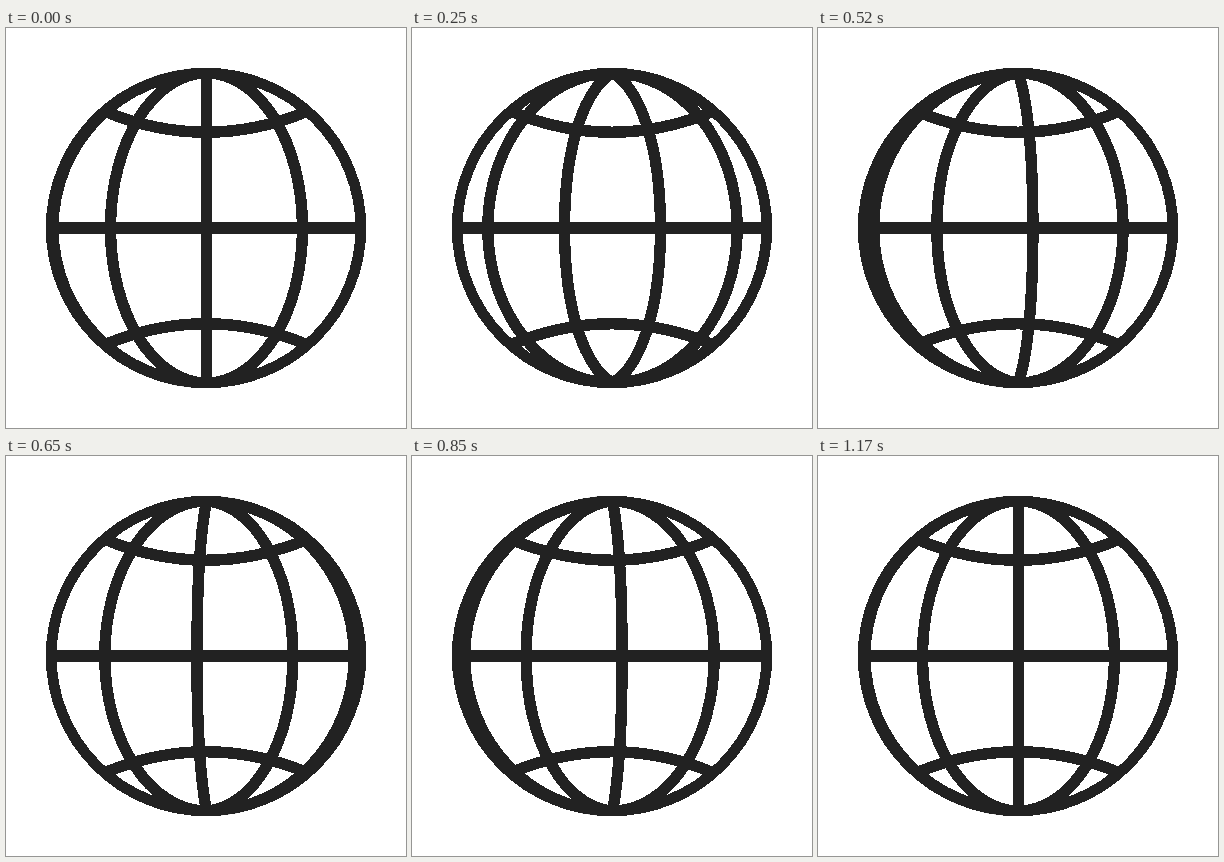
Recreate the animation shown at these times as an HTML page. Size 400x400 px, loop 1200 ms.

```html
<!DOCTYPE html>
<html lang="en">
<head>
<meta charset="utf-8">
<title>Spinning globe</title>
<style>
  html, body { margin: 0; width: 100%; height: 100%; overflow: hidden; background: #fff; }
  svg { display: block; width: 100vw; height: 100vh; }
</style>
</head>
<body>
<svg viewBox="0 0 400 400" fill="none" stroke="#222" stroke-width="11.4" shape-rendering="crispEdges">
  <clipPath id="disc"><circle cx="200" cy="200" r="160"/></clipPath>
  <g id="meridians" clip-path="url(#disc)"></g>
  <circle cx="200" cy="200" r="154.8" stroke-width="10.8"/>
  <path d="M45 200H355" stroke-width="12"/>
  <path d="M98 83Q200 125.5 302 83M98 317Q200 274.5 302 317"/>
</svg>
<script>
const LOOP = 1200, SPIN = 500 / 3, TURNS = 7, TICK = 25;
const CX = 200.5, R = 155, KAPPA = 0.5523;

// Stops a meridian passes: offset at the equator, handle length at the poles
const stops = [[-153.5, 0], [-96, 0], [0, 30], [96, 0], [153.5, 0]];

const mix = (a, b, p) => a + (b - a) * p;

// Half an ellipse from pole to pole
function meridian(i, p) {
  const [a, b] = [stops[i], stops[i + 1]];
  const dx = mix(a[0], b[0], p), h = mix(a[1], b[1], p);
  const x = CX + dx, near = CX + dx * KAPPA, dy = R * KAPPA;
  return `M${CX} ${200 - R}C${near} ${200 - R + h} ${x} ${200 - dy} ${x} 200` +
    `C${x} ${200 + dy} ${near} ${200 + R - h} ${CX} ${200 + R}`;
}

// Seven linear turns, then a short rest until the loop restarts
const phase = t => Math.min(t / SPIN, TURNS) % 1;

const group = document.getElementById('meridians');
for (let i = 0; i < stops.length - 1; i++) {
  const path = document.createElementNS('http://www.w3.org/2000/svg', 'path');
  path.setAttribute('d', meridian(i, 0));
  group.append(path);

  const frames = [];
  for (let t = 0; t < LOOP; t += TICK) {
    frames.push({
      offset: Math.floor(t / 10) * 10 / LOOP,
      d: `path("${meridian(i, phase(t))}")`,
      easing: 'step-end'
    });
  }
  frames.push({ ...frames[frames.length - 1], offset: 1 });
  path.animate(frames, { duration: LOOP, iterations: Infinity });
}
</script>
</body>
</html>
```
